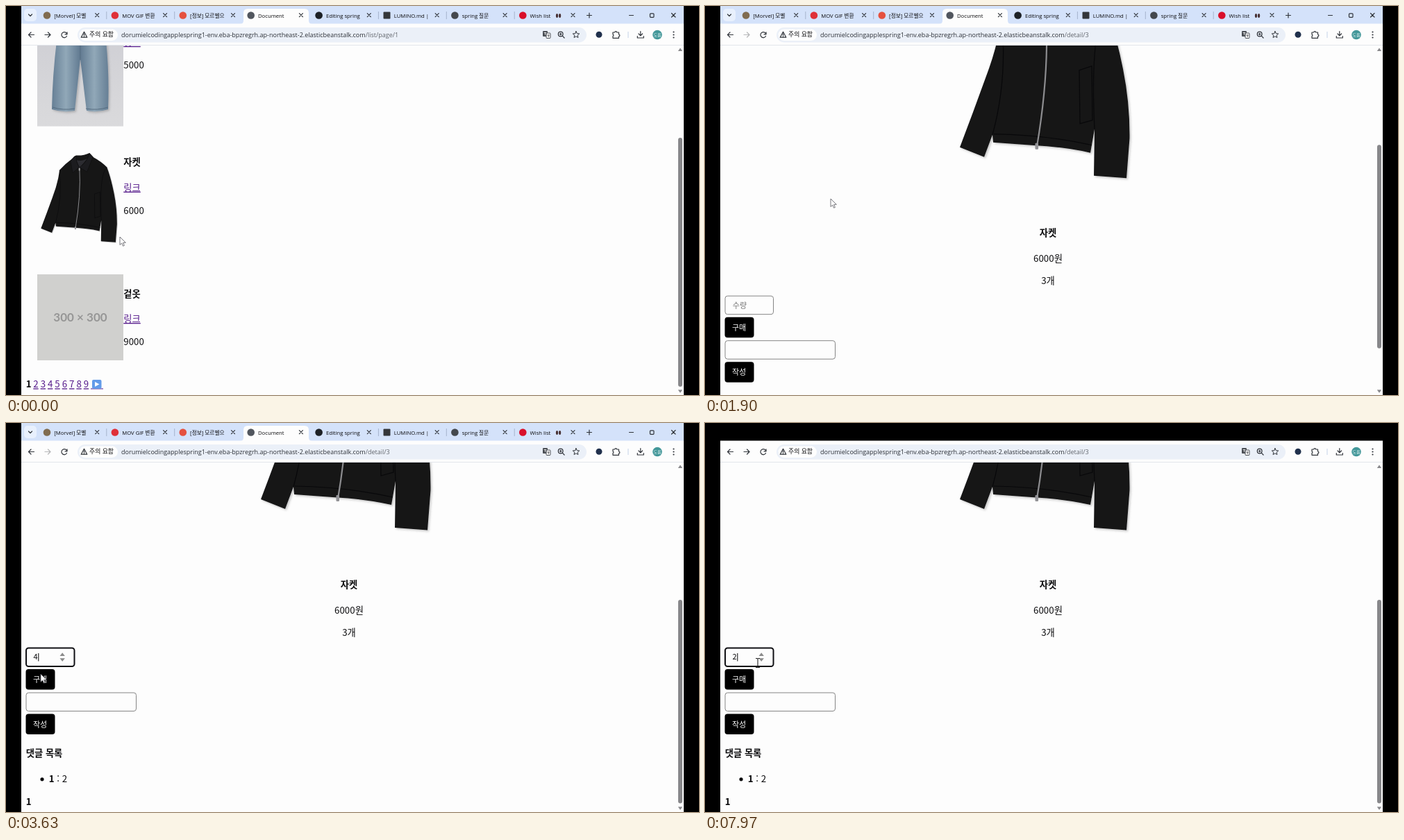
These frames come from a looping animation (998x561 px, 8 s). An HTML page:

```html
<!DOCTYPE html>
<html lang="ko">
<head>
<meta charset="utf-8">
<title>Shop order walkthrough</title>
<style>
html, body { margin: 0; width: 100%; height: 100%; overflow: hidden; background: #000; }
svg { display: block; }
text { white-space: pre; fill: #0b0b0d; }
.page text { font: 13.3px "Noto Sans CJK KR", "Noto Sans CJK", "Noto Sans", sans-serif; }
.page .bold { font-weight: 700; }
.page .small { font-size: 11px; }
.page .mid { text-anchor: middle; }
.page .link { fill: #551a8b; text-decoration: underline; }
.page .nav { letter-spacing: -.5px; }
.page .visited { fill: #44167c; }
.page .brand { font-size: 14px; font-weight: 700; }
.page .white { fill: #fff; }
.page .hint { fill: #757575; }
.page .box { font: 700 17px Lato, sans-serif; fill: #969696; }
.ui text { font: 7.7px "Open Sans", "Noto Sans CJK KR", "Noto Sans CJK", sans-serif; }
.ui .url { font-size: 9px; fill: #2b2f36; }
.ui .chip { font-size: 8.9px; }
.line { fill: none; stroke: #30343a; stroke-width: 1.2; stroke-linecap: round; stroke-linejoin: round; }
.field { fill: #fdfdfd; stroke: #858585; }
</style>
</head>
<body>
<svg id="stage" width="100%" height="100%" viewBox="0 0 998 561"></svg>
<script>
const LOOP = 8000;
const MAX_SCROLL = 318;
const HOST = 'dorumielcodingapplespring1-env.eba-bpzregrh.ap-northeast-2.elasticbeanstalk.com';
const OPEN_DETAIL = 950, SUBMIT = 3800, GO_BACK = 5930;

const cursorKeys = [
  [0, 164, 333], [150, 164, 333], [700, 179, 263], [1450, 179, 263],
  [1900, 181, 278], [2250, 181, 278], [2600, 44, 341], [2950, 44, 341],
  [3400, 50, 362], [4200, 50, 362], [4670, 73, 234], [5150, 73, 234],
  [5700, 36, 41], [5920, 36, 41], [6250, 146, 335], [6700, 146, 335],
  [7150, 76, 346], [LOOP, 76, 346]
];
const scrollKeys = [[0, 0], [1600, 0], [1900, 224], [2200, MAX_SCROLL], [LOOP, MAX_SCROLL]];
const quantityKeys = [[0, ''], [3100, '4'], [7450, ''], [7750, '2']];

// y is the vertical middle of the line
const text = (x, y, str, cls = '') => `<text x="${x}" y="${y + 4.9}" class="${cls}">${str}</text>`;
const rect = (x, y, w, h, fill, r = 0, extra = '') =>
  `<rect x="${x}" y="${y}" width="${w}" height="${h}" rx="${r}" fill="${fill}" ${extra}/>`;
const dot = (x, y, r, fill) => `<circle cx="${x}" cy="${y}" r="${r}" fill="${fill}"/>`;
const line = (d, extra = '') => `<path class="line" d="${d}" ${extra}/>`;
const shape = (d, fill, extra = '') => `<path d="${d}" fill="${fill}" ${extra}/>`;
const group = (id, body, cls = '') => `<g id="${id}" class="${cls}">${body}</g>`;

function tabs() {
  const list = [
    ['[Morvel] 모벨', '#806c50'], ['MOV GIF 변환', '#df3038'], ['[정보] 모르벨으', '#e5513f'],
    ['Document', '#51565e'], ['Editing spring', '#1d2126'], ['LUMINO.md |', '#33363a'],
    ['spring 질문', '#44484d'], ['Wish list', '#d90f2a']
  ];
  const tab = ([title, color], i) => {
    const x = 59 + 97.9 * i;
    const mark = i === 5 ? rect(x - 5, 8.5, 10, 10, color, 1) : dot(x, 13.5, 5.3, color);
    const divider = i === 2 || i === 3 || i === 7 ? '' : rect(x + 85.3, 8, 1, 11, '#a5b4cc');
    return mark + divider +
      `<svg x="${x + 10.3}" y="4" width="49" height="18"><text x="0" y="12.8">${title}</text></svg>` +
      line(`M${x + 69.7} 10.7l5 5m0-5l-5 5`, 'stroke-width="1"');
  };
  return rect(22, 0, 954, 26, '#d4e2fa') +
    rect(26, 4, 18, 18, '#e8f0fd', 5) + line('M32.5 12l2.5 2.5 2.5-2.5') +
    shape('M337 26q5 0 5-5V10q0-6 6-6h82q6 0 6 6v11q0 5 5 5z', '#fdfdfd') +
    list.map(tab).join('') +
    '<ellipse cx="793.5" cy="14" rx="1.6" ry="3" fill="#473033"/><ellipse cx="797.6" cy="14" rx="1.6" ry="3" fill="#473033"/>' +
    line('M836.5 13.5h7m-3.5-3.5v7M897.5 13.5h6M958.5 10.5l5.5 5.5m0-5.5l-5.5 5.5') +
    '<rect class="line" x="927.5" y="10.8" width="5.5" height="5.5" rx="1"/>';
}

function toolbar() {
  const star = Array.from({ length: 10 }, (_, i) => {
    const a = i * Math.PI / 5 - Math.PI / 2, r = i % 2 ? 2.3 : 5;
    return `${821 + r * Math.cos(a)},${41.5 + r * Math.sin(a)}`;
  }).join(' ');
  return rect(22, 25.5, 954, 31.5, '#fdfdfd') + rect(22, 56, 954, 1, '#e3e6eb') +
    rect(103, 31, 733, 21.5, '#ebf0f8', 10.75) + rect(105.5, 33.5, 55.5, 16.5, '#fefefe', 8.25) +
    line('M40.5 41.5h-8m3.5-3.5l-3.5 3.5 3.5 3.5') +
    `<g id="forward">${line('M56 41.5h8m-3.5-3.5l3.5 3.5-3.5 3.5')}</g>` +
    line('M87.8 40.5a4 4 0 1 0-.3 3M88 37.8v3h-3') +
    line('M112.5 37.2l4.3 8h-8.6zM112.5 40.2v2.3m0 1.3v.1', 'stroke-width="1"') +
    text(120, 39.5, '주의 요함', 'chip') +
    `<text class="url" x="166" y="44.8">${HOST}<tspan id="path" fill="#62666d"></tspan></text>` +
    group('translate', rect(773, 36, 7, 8, '#4a4e54', 1) +
      rect(778, 39, 6, 7.5, '#fdfdfd', 1, 'stroke="#4a4e54"') +
      line('M775 38.5h3m-1.5 0v3', 'style="stroke:#fff;stroke-width:.8"') + line('M779.8 42h2.5m-1 0v2.5', 'style="stroke-width:.8"')) +
    '<circle class="line" cx="798.7" cy="40.5" r="3.4"/>' + line('M801.3 43.2l2.8 2.8M797.2 40.5h3m-1.5-1.5v3') +
    `<polygon class="line" style="stroke-width:1" points="${star}"/>` +
    dot(854, 41.3, 4.5, '#20304c') +
    line('M874 38h2.8a1.4 1.4 0 0 1 2.8 0h2.9v3a1.4 1.4 0 0 1 0 2.8v2.5H874v-2.8a1.4 1.4 0 0 0 0-2.6z') +
    rect(895.5, 37, 1, 9, '#c5d3ea') +
    line('M913.8 36.5v6.2m-2.8-2.7l2.8 2.8 2.8-2.8M909.3 43.5v2.5h9v-2.5') +
    dot(938, 41.5, 6.8, '#439799') +
    '<text x="938" y="43.7" text-anchor="middle" style="font-size:6px;fill:#e8f5f5">도름</text>' +
    [37.5, 41.5, 45.5].map(y => dot(961.5, y, 1.1, '#30343a')).join('');
}

const jacket = '<g filter="url(#soft)">' +
  shape('M427 240Q446 219 468 203Q474 194 481 193Q505 194 523 185L536 199Q562 213 579 231Q592 265 602 315Q612 365 611.5 415L607 472.5L560 469L561 402L555 436Q515 427 470 425L415 421L414 410L402 442L367 428Q386 378 404 328Q422 281 427 240Z', '#151517') + '</g>' +
  shape('M481 208Q501 213 517 202L491 233Z', '#2c2c31') +
  shape('M468 203L481 194Q477 207 490 231L469 249L462 211ZM523 186L534 198L515 246L491 231Q516 214 523 186Z', '#1c1c1f', 'stroke="#0a0a0b"') +
  shape('M539 317L557 311L558 389L540 394ZM579 231Q554 252 561 402M427 240Q436 330 414 410M416 409Q490 410 557 425', 'none', 'stroke="#08080a" stroke-width="1.2"') +
  shape('M491 234Q496 320 478 427', 'none', 'stroke="#8d8d90" stroke-width="2.2"') +
  rect(488.5, 233, 4, 9, '#aaa', 1) + rect(475.5, 422, 4.5, 9, '#929296', 1);

const jeans = rect(45, 50, 124, 123.5, 'url(#studio)') +
  shape('M73 50H144Q149 100 147 149Q132 154 116 151L107 76L99 151Q82 154 66 149Q67 100 73 50Z', 'url(#denim)', 'filter="url(#soft)"') +
  shape('M107 50V78M67 146Q82 151 99 148M115 148Q132 151 147 146', 'none', 'stroke="#566c80"');

function listPage() {
  const item = (title, price, y) => text(169.3, y, title, 'bold') +
    text(169.3, y + 36.5, '링크', 'link') + text(169.3, y + 69.5, price);
  let pages = text(28.7, 545.5, '1', 'bold');
  for (let n = 2; n < 10; n++) pages += text(39.3 + 10.35 * (n - 2), 545.5, n, 'link');
  return jeans + item('바지', '5000', 15.5) +
    `<g transform="translate(-114.1 129.1) scale(.448)">${jacket}</g>` + item('자켓', '6000', 225.3) +
    rect(45, 387, 124, 124, '#d0d0ce') +
    '<text class="box" x="107" y="455" text-anchor="middle">300 × 300</text>' + item('겉옷', '9000', 414.6) +
    pages + rect(122, 551.5, 18, 1, '#551a8b') + rect(124, 539, 13.5, 13, '#639be9', 2) +
    shape('M128 542l6.5 3.5-6.5 3.5z', '#fff');
}

function detailPage() {
  const nav = [[114, 'Mainpage'], [179, 'List'], [278, 'Write'], [319.5, 'MyPage'], [375.7, 'Logout']];
  const button = (y, label) => rect(28.5, y, 42, 29.5, '#000', 4) + text(39, y + 14.2, label, 'small white');
  return text(37, 82.5, 'FlorinMart', 'nav brand') +
    nav.map(([x, label]) => text(x, 82.5, label, 'nav visited')).join('') +
    text(207, 82.5, 'trialOwner', 'nav') +
    text(494, 127, '상세페이지', 'bold mid') + jacket +
    text(494, 551.3, '자켓', 'bold mid') + text(494, 588, '6000원', 'mid') + text(494, 620, '3개', 'mid') +
    '<rect id="quantity" class="field" x="29" y="642.5" width="69.5" height="26.5" rx="3.5"/>' +
    group('hint', text(39.8, 655.2, '수량', 'small hint')) +
    '<text id="value" class="small" x="39.5" y="659.4"></text>' +
    '<rect id="caret" y="650" width="1" height="11.5"/>' +
    group('spinner', shape('M77.5 654l3.7-4.8 3.7 4.8zM77.5 657.2l3.7 4.8 3.7-4.8z', '#8b8b8b')) +
    button(673, '구매') +
    '<rect class="field" x="29" y="707" width="158.5" height="26.5" rx="3.5"/>' +
    button(737.6, '작성') +
    text(28.7, 794.4, '댓글 목록', 'bold') + dot(52, 831.8, 2.6, '#0b0b0d') +
    text(61.7, 831.4, '<tspan font-weight="700">1</tspan> : 2') + text(28.7, 864, '1', 'bold');
}

const errorPage = text(28.7, 73.5, '에러페이지', 'bold') +
  ['500', 'Internal Server Error', '/order', '수량이 부족함'].map((s, i) => text(28.5, 110.5 + 32.2 * i, s)).join('') +
  text(28.7, 242.6, '메인페이지로 돌아가기', 'bold small') + text(28.7, 279, '메인페이지', 'link');

const cursors = {
  arrow: shape('M0 0V11.5l2.7-2.5 1.8 4.2 1.9-.8-1.8-4.1h3.7z', '#fff', 'stroke="#55555c" stroke-width=".8"'),
  beam: shape('M-3-6.5h2q1 0 1 1 0-1 1-1h2M0-5.5V5.5M-3 6.5h2q1 0 1-1 0 1 1 1h2', 'none', 'stroke="#222" stroke-width="1.1"'),
  hand: shape('M-1 1q1-2 2 0v5l6 1.3q1.5.5 1 2.5l-1 4H1l-4-5q1-1.5 2 0z', '#fff', 'stroke="#333" stroke-width=".8"')
};

document.getElementById('stage').innerHTML = `<defs>
  <clipPath id="view"><rect x="22" y="57" width="954" height="504"/></clipPath>
  <filter id="soft"><feDropShadow dx="2" dy="2" stdDeviation="1.5" flood-color="#555" flood-opacity=".3"/></filter>
  <linearGradient id="studio" x2="0" y2="1"><stop stop-color="#d0d0d5"/><stop offset="1" stop-color="#dadadc"/></linearGradient>
  <linearGradient id="denim"><stop stop-color="#667f95"/><stop offset=".25" stop-color="#91a8b8"/>
    <stop offset=".5" stop-color="#617a91"/><stop offset=".75" stop-color="#91a8b8"/><stop offset="1" stop-color="#667f95"/></linearGradient>
  </defs>` +
  rect(0, 0, 998, 561, '#000') + rect(22, 57, 954, 504, '#fdfdfd') +
  '<g class="page" clip-path="url(#view)">' +
  group('list', listPage()) + group('detail', detailPage()) + group('error', errorPage) + '</g>' +
  group('scrollbar', shape('M967.8 65l3.2-4.5 3.2 4.5zM967.8 553.5l3.2 4.5 3.2-4.5z', '#88888b') +
    '<rect id="thumb" x="968" width="6" rx="3" fill="#87878a"/>') +
  group('tabs', tabs(), 'ui') + group('toolbar', toolbar(), 'ui') +
  group('cursor', Object.entries(cursors).map(([id, body]) => group(id, body)).join(''));

const el = {};
document.querySelectorAll('#stage [id]').forEach(node => el[node.id] = node);
const show = (id, on) => el[id].style.display = on ? '' : 'none';
const set = (id, attrs) => Object.entries(attrs).forEach(([k, v]) => el[id].setAttribute(k, v));
const smooth = p => p * p * (3 - 2 * p);

function track(keys, t, ease = p => p) {
  const i = keys.findIndex(k => k[0] > t);
  const a = keys[i - 1], b = keys[i];
  const p = ease((t - a[0]) / (b[0] - a[0]));
  return a.slice(1).map((v, n) => v + (b[n + 1] - v) * p);
}

function render(t) {
  const page = t < OPEN_DETAIL ? 'list' : t >= SUBMIT && t < GO_BACK ? 'error' : 'detail';
  const detail = page === 'detail';
  const [x, y] = track(cursorKeys, t, smooth);
  const [scroll] = track(scrollKeys, t);
  const value = quantityKeys.filter(k => k[0] <= t).pop()[1];
  const focused = detail && (t >= 2900 && t < SUBMIT || t >= 7250);
  const overField = detail && scroll === MAX_SCROLL && x > 29 && x < 99 && y > 324 && y < 351;
  const overLink = page === 'list' && x > 169 && x < 194 && y > 255 && y < 270;

  ['list', 'detail', 'error'].forEach(id => show(id, id === page));
  show('tabs', t < SUBMIT);
  show('translate', page !== 'error');
  show('scrollbar', page !== 'error');
  set('forward', { opacity: page === 'list' || t >= GO_BACK ? 1 : .35 });
  el.path.textContent = { list: '/list/page/1', detail: '/detail/3', error: '/order' }[page];

  set('detail', { transform: `translate(0 ${-scroll})` });
  set('thumb', detail ? { y: 69 + scroll * .585, height: 293.5 } : { y: 190, height: 359 });
  el.value.textContent = value;
  show('hint', !value);
  show('caret', focused);
  set('caret', { x: value ? 46.3 : 39.5 });
  show('spinner', overField || focused);
  el.quantity.style.stroke = focused ? '#101014' : '';
  el.quantity.style.strokeWidth = focused ? 2 : 1;

  set('cursor', { transform: `translate(${x} ${y})` });
  const kind = overField ? 'beam' : overLink ? 'hand' : 'arrow';
  Object.keys(cursors).forEach(id => show(id, id === kind));
}

const start = performance.now();
function tick() {
  render((performance.now() - start) % LOOP);
  requestAnimationFrame(tick);
}
tick();
</script>
</body>
</html>
```
